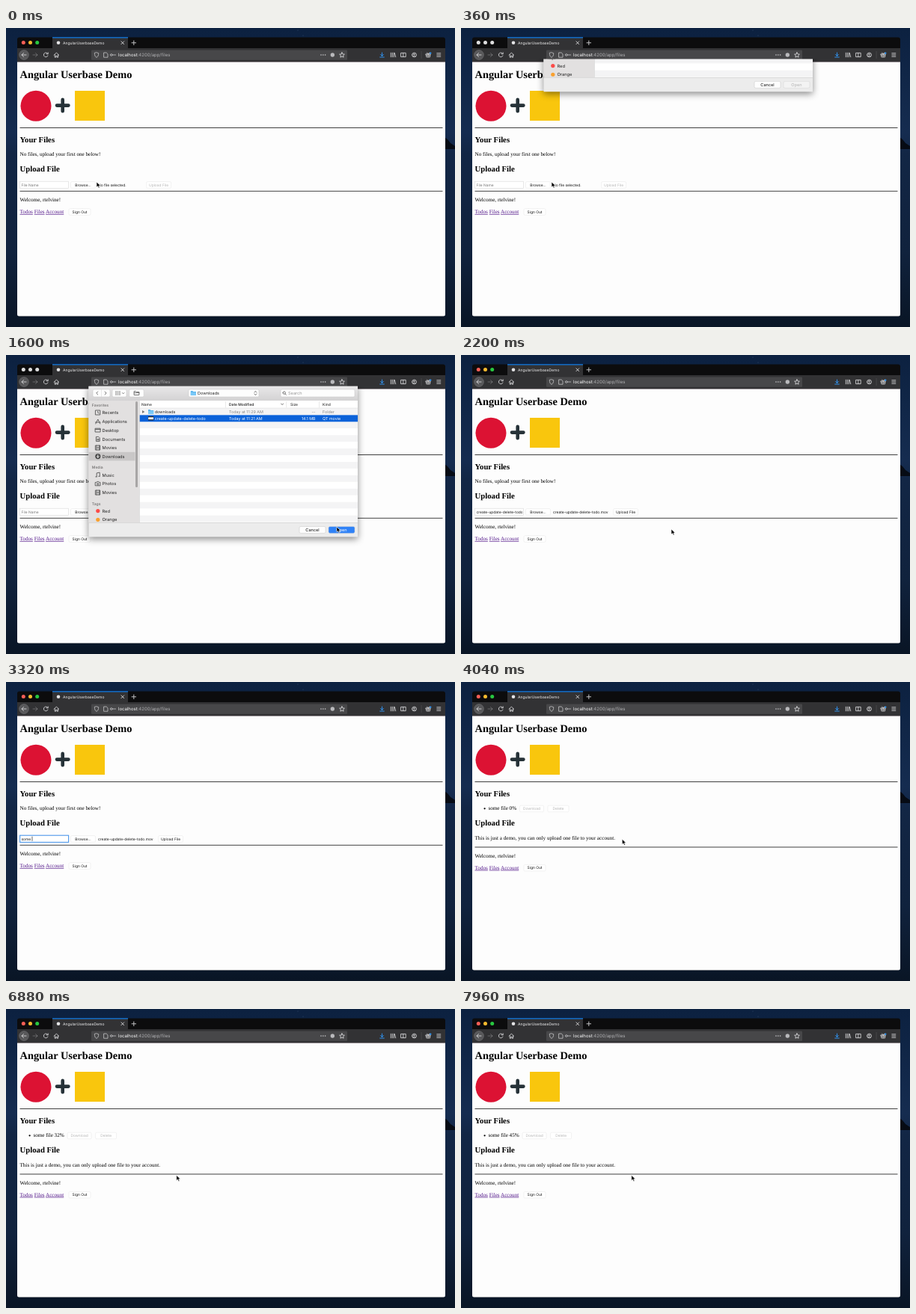
These frames come from a looping animation (600 px wide and 400 px high, 8000 ms). An HTML page:

```html
<!DOCTYPE html>
<html lang="en">
<head>
<meta charset="utf-8">
<title>Angular Userbase Demo</title>
<style>
  html, body { margin: 0; width: 100%; height: 100%; overflow: hidden; background: #0c1c33; }
  svg { display: block; width: 600px; height: 400px; }
  text { white-space: pre; text-rendering: geometricPrecision; font-family: Inter, "Open Sans", sans-serif; }
  .page text.serif { font-family: "Liberation Serif", "Times New Roman", serif; }
  .link { fill: #551a8b; text-decoration: underline; }
  .icon { fill: none; stroke: #d4d4d6; stroke-width: .9; stroke-linecap: round; stroke-linejoin: round; }
  #sheet { filter: drop-shadow(0 3px 5px rgba(0, 0, 0, .45)); }
</style>
</head>
<body>
<svg id="stage" viewBox="0 0 600 400" xmlns="http://www.w3.org/2000/svg"></svg>
<script>
const LOOP = 8000;
const BODY = 7.17, CTRL = 4.92;

const rect = (x, y, w, h, fill, more = '') =>
  `<rect x="${x}" y="${y}" width="${w}" height="${h}" fill="${fill}" ${more}/>`;
const dot = (x, y, r, fill, more = '') =>
  `<circle cx="${x}" cy="${y}" r="${r}" fill="${fill}" ${more}/>`;
const icon = (d, more = '') => `<path class="icon" d="${d}" ${more}/>`;
const sans = (x, y, s, size = CTRL, fill = '#111', more = '') =>
  `<text x="${x}" y="${y}" font-size="${size}" fill="${fill}" ${more}>${s}</text>`;
const serif = (x, y, s, size = BODY, more = '') =>
  `<text class="serif" x="${x}" y="${y}" font-size="${size}" fill="#000" ${more}>${s}</text>`;
const mid = 'text-anchor="middle"';
const button = (x, w, y, label, fill = '#111', id = '') =>
  `<g ${id && `id="${id}"`}>` +
  rect(x, y, w, 8.6, '#fff', 'rx="1.5" stroke="#e9e9e9" stroke-width=".6"') +
  sans(x + w / 2, y + 6.1, label, CTRL, fill, mid) + '</g>';

function wallpaper() {
  return `<defs>
    <linearGradient id="sky" x2="0" y2="1">
      <stop offset="0" stop-color="#0c2140"/><stop offset=".35" stop-color="#152c50"/>
      <stop offset=".42" stop-color="#122645"/><stop offset=".75" stop-color="#10223d"/>
      <stop offset="1" stop-color="#091525"/>
    </linearGradient>
    <linearGradient id="bar" x2="0" y2="1">
      <stop offset="0" stop-color="#e9e8e9"/><stop offset="1" stop-color="#d3d2d3"/>
    </linearGradient>
    <clipPath id="under"><rect x="60" y="41.5" width="460" height="330"/></clipPath>
    <clipPath id="field"><rect x="19.5" y="205" width="63" height="10"/></clipPath>
    <clipPath id="list"><rect x="110" y="61" width="360" height="163"/></clipPath>
  </defs>` + rect(0, 0, 600, 400, 'url(#sky)') +
  '<path d="M586 146l4 3 4 5 6 4v4h-14z" fill="#060b14"/>' +
  dot(397, 10, .4, '#5d7596') + dot(390, 3, .4, '#5d7596');
}

function browser() {
  const lights = ['#ff5f57', '#febc2e', '#28c840']
    .map((c, i) => dot(23.3 + i * 9.2, 19.6, 2.5, c, `class="light" data-on="${c}"`)).join('');
  return rect(15, 12.5, 572, 373, '#0c0c0d', 'rx="3"') +
    rect(62, 12.5, 101, 15, '#323234') + rect(62, 12.3, 101, 1.1, '#0a84ff') +
    lights + dot(70, 19.8, 2.3, '#e4e4e6') +
    sans(76, 21.7, 'AngularUserbaseDemo', 5.05, '#f4f4f5') +
    icon('M153.9 17.9l3.8 3.8m0-3.8l-3.8 3.8M168 19.8h5.6m-2.8-2.8v5.6') +
    rect(15, 27, 572, 18.2, '#323234') + rect(15, 45, 572, .7, '#4a3440') +
    dot(24, 36, 6.4, '#58585a', 'stroke="#77777a" stroke-width=".5"') +
    icon('M27 36h-6m2.5-2.5l-2.5 2.5 2.5 2.5') +
    icon('M36 36h6m-2.5-2.5l2.5 2.5-2.5 2.5', 'opacity=".35"') +
    icon('M55.8 34.4a2.9 2.9 0 1 0 .2 2.6M56.2 32.8v2h-2') +
    icon('M64.2 36.2l3.2-3.2 3.2 3.2m-5.4-.6v3.6h1.5v-2h1.4v2h1.5v-3.6') +
    rect(114, 29.5, 342, 13.3, '#474749', 'rx="1.2"') +
    icon('M121 32.8l2.7.9c0 3-.8 4.6-2.7 5.7-1.9-1.1-2.7-2.7-2.7-5.7z', 'opacity=".8"') +
    icon('M131 33h3.2l1.8 1.8v4.4h-5z', 'opacity=".8"') +
    icon('M142.2 36h4.4M139.4 36a1.3 1.3 0 1 0 2.7 0 1.3 1.3 0 1 0-2.7 0', 'opacity=".8"') +
    sans(150, 38.2, '<tspan fill="#fff">localhost</tspan>:4200/app/files', 6, '#b0b0b3') +
    [421, 423.8, 426.6].map(x => dot(x, 36, .8, '#d4d4d6')).join('') +
    dot(436.3, 36, 2.7, '#b9b9bc') +
    icon('M449 32.7l1 2.2 2.4.3-1.8 1.6.5 2.4-2.1-1.2-2.1 1.2.5-2.4-1.8-1.6 2.4-.3z') +
    '<g transform="translate(0 36)">' +
    icon('M502.5-3v4.4m-2-2l2 2 2-2m-4.8 3.6h5.6', 'style="stroke:#2f9bff"') +
    icon('M514.3-2.8v5.6m2-5.6v5.6m2-5.6v5.6m1-5.4l1.4 5.4') +
    icon('M528-2.6h6.2v5.2H528zM530.8-2.6v5.2') +
    icon('M542.6 0a2.9 2.9 0 1 0 5.8 0 2.9 2.9 0 1 0-5.8 0m1.5 1.9q1.4-1.4 2.8 0M544.7-.8a.8.8 0 1 0 1.6 0 .8.8 0 1 0-1.6 0') +
    rect(554.8, -5, .5, 10, '#59595b') +
    icon('M561.3-1.2h5.8v1.4h-5.8zm.5 1.6v2.4h4.8V.4M564.2-1.2v4m0-4l-1.6-1.8m1.6 1.8l1.6-1.8') +
    dot(567.2, -2.4, 1.2, '#2f9bff') +
    icon('M575.8-2.2h5m-5 2.2h5m-5 2.2h5') + '</g>';
}

function page() {
  const h2 = (y, s) => serif(18.5, y, s, 10.72, 'font-weight="700"');
  const rule = y => rect(18.5, y, 565, .9, '#2b2b2b');
  return '<g class="page">' +
    '<path d="M15 45.6h572v337.4q0 2.5-2.5 2.5h-567q-2.5 0-2.5-2.5z" fill="#fdfdfd"/>' +
    serif(18.5, 67.4, 'Angular Userbase Demo', 14.38, 'font-weight="700"') +
    dot(40, 104.3, 20.5, '#dc1233') +
    '<path d="M68 103.6h15.4M75.7 95.9v15.4" stroke="#263238" stroke-width="4.6" stroke-linecap="round"/>' +
    rect(92, 84, 40, 40, '#f9c60d') +
    rule(133) + h2(152.6, 'Your Files') + h2(192, 'Upload File') +
    '<g id="form">' + serif(18.5, 171.2, 'No files, upload your first one below!') +
    '<rect id="box" x="18.6" y="205.2" width="65" height="9.2" fill="#fff"/>' +
    '<rect id="mark" x="20.2" y="206.4" width="62" height="6.8" fill="#b3d7ff"/>' +
    `<g clip-path="url(#field)">${sans(20.5, 211.6, '', CTRL, '#111', 'id="name"')}</g>` +
    rect(0, 206.6, .6, 6.2, '#000', 'id="caret"') +
    button(86.5, 33, 205.6, 'Browse...') +
    sans(123, 211.7, '', CTRL, '#111', 'id="picked"') +
    button(187.6, 33, 205.6, 'Upload File', '#111', 'send') + '</g>' +
    '<g id="done">' + dot(31.6, 169.3, 1.15, '#000') +
    serif(36.4, 171.2, '', BODY, 'id="pct"') +
    '<g id="acts">' + button(78.5, 32, 165.2, 'Download', '#b4b4b4') +
    button(116, 28, 165.2, 'Delete', '#b4b4b4') + '</g>' +
    serif(18.5, 210.9, 'This is just a demo, you can only upload one file to your account.') + '</g>' +
    '<g id="foot">' + rule(217.8) + serif(18.5, 232, 'Welcome, rtelvine!') +
    serif(18.5, 247.9, ['Todos', 'Files', 'Account'].map(s => `<tspan class="link">${s}</tspan>`).join(' ')) +
    button(84, 29, 241.7, 'Sign Out') + '</g></g>';
}

const folder = (x, y) =>
  `<path d="M${x} ${y}h2.6l.8.9h3.8v5.2h-7.2z" fill="#5ab5ee"/>` + rect(x, y + 2, 7.2, 4.1, '#79c8f7');

function sidebar() {
  const glyphs = {
    clock: 'M-3-3h6v6h-6zM0-1.6V.2l1.4.8',
    apps: 'M-3 3L0-3l3 6M-3.4 1h6.8',
    desk: 'M-3.3-2.4h6.6v4.8h-6.6zM-3.3-1h6.6',
    docs: 'M-2-3h3l1.4 1.4V3H-2zM-1 0h2.4M-1 1.4h2.4',
    film: 'M-3-3h6v6h-6zM-1.7-3v6M1.7-3v6M-1.7 0h3.4',
    music: 'M-1.6 2.4v-5l4-.8v5M-3 2.4h1.3M1 1.8h1.3',
    photo: 'M-3.2-1.8h1.6l.6-1h2l.6 1h1.6v4.4h-6.4zM-1.2.4a1.2 1.2 0 1 0 2.4 0 1.2 1.2 0 1 0-2.4 0'
  };
  const items = [
    [77, 'Recents', 'clock'], [89, 'Applications', 'apps'], [100.6, 'Desktop', 'desk'],
    [112.4, 'Documents', 'docs'], [124, 'Movies', 'film'], [135.6, 'Downloads'],
    [160.5, 'Music', 'music'], [172.2, 'Photos', 'photo'], [184, 'Movies', 'film'],
    [208.6, 'Red', '', '#fc4b48'], [220.3, 'Orange', '', '#f9a02e']
  ];
  return rect(110.5, 61, 67.8, 163, '#e2e0e0') + rect(110.5, 129.8, 62, 11.6, '#c9c7c7') +
    [[67, 'Favorites'], [150.5, 'Media'], [198.6, 'Tags']]
      .map(([y, s]) => sans(114.8, y + 1.9, s, 5, '#7b7979', 'font-weight="600"')).join('') +
    items.map(([y, s, g, c]) => sans(128.5, y + 2.1, s, 5.72, '#222') + (g
      ? `<g transform="translate(122.8 ${y})">${icon(glyphs[g], 'style="stroke:#555"')}</g>`
      : c ? dot(122.8, y, 2.6, c)
      : dot(122.8, y, 3.6, '#4b4b4b') + icon(`M122.8 ${y - 2}v3.6m-1.5-1.5l1.5 1.5 1.5-1.5`, 'style="stroke:#fff"')
    )).join('') +
    rect(173, 62, 3, 115, '#a8a6a6', 'rx="1.5"');
}

function sheet() {
  const box = (x, w, h = 10, y = 46) =>
    rect(x, y, w, h, '#fdfdfd', 'rx="1.8" stroke="#c6c6c6" stroke-width=".5"');
  const dark = d => icon(d, 'style="stroke:#666"');
  const cell = (x, y, s, fill = '#858585', more = '') => sans(x, y, s, 5.36, fill, more);
  const head = (x, s, w = 500) => sans(x, 67.5, s, 4.95, '#333', `font-weight="${w}"`);
  let rows = '';
  for (let i = 0; i < 17; i++) rows += rect(178.3, 71.4 + i * 8.95, 291.7, 8.95, i % 2 ? '#fff' : '#f4f4f5');
  return rect(110.5, 41.5, 359.5, 201.8, '#ececec') + rect(110.5, 41.5, 359.5, 19.5, 'url(#bar)') +
    box(116, 23) + rect(127.4, 46, .5, 10, '#d0d0d0') + box(142, 19) + box(164.7, 19.5) +
    dark('M122.7 49l-2 2 2 2m9.4-4l2 2-2 2') +
    dark('M146.5 49h1m1.5 0h1m1.5 0h1m-6 2h1m1.5 0h1m1.5 0h1m-6 2h1m1.5 0h1m1.5 0h1m3-2.4l1.2 1.2 1.2-1.2') +
    dark('M171.5 48.6h2l.8.9h3.6v4h-6.4zM171.5 50.6h6.4') +
    box(244, 94) + folder(246.8, 48) + sans(256, 53, 'Downloads', 5.5, '#222') +
    dark('M332 50l1.4-1.6 1.4 1.6m-2.8 2l1.4 1.6 1.4-1.6') +
    box(367, 99) + dark('M370 50.6a1.7 1.7 0 1 0 3.4 0 1.7 1.7 0 1 0-3.4 0m3 1.3l1.4 1.4') +
    sans(377, 53, 'Search', 5.6, '#999') +
    `<g clip-path="url(#list)">${rect(178.3, 61, 291.7, 163, '#fff')}${rows}` +
    rect(178.3, 80.35, 291.7, 8.95, '#0b62d9', 'id="pick"') +
    head(181, 'Name') + head(298, 'Date Modified', 600) + head(380, 'Size') + head(423, 'Kind') +
    dark('M367.6 65.2l1.5 1.3 1.5-1.3') +
    [293.2, 374.6, 418].map(x => rect(x, 62, .5, 8.5, '#d3d3d3')).join('') +
    rect(178.3, 70.8, 291.7, .5, '#d3d3d3') +
    '<path d="M182 74l3.4 2-3.4 2z" fill="#777"/>' + folder(190, 73) +
    cell(198.7, 77.8, 'downloads', '#222') + cell(298, 77.8, 'Today at 11:29 AM') +
    cell(413.5, 77.8, '--', '#858585', 'text-anchor="end"') + cell(423, 77.8, 'Folder') +
    rect(190, 82, 7.2, 5.4, '#222') + rect(190.2, 83.3, 6.8, 2.9, '#fff') +
    '<g id="row">' + cell(198.7, 86.7, 'create-update-delete-todo', '#222') +
    cell(298, 86.7, 'Today at 11:21 AM') +
    cell(413.5, 86.7, '14.1 MB', '#858585', 'text-anchor="end"') + cell(423, 86.7, 'QT movie') + '</g>' +
    sidebar() + '</g>' + rect(178.1, 61, .5, 163, '#cfcfcf') + rect(110.5, 224, 359.5, .6, '#cdcdcd') +
    box(392, 35, 9, 229.4) + sans(409.5, 235.9, 'Cancel', 5.6, '#111', mid) +
    rect(431, 229.4, 35, 9, '#f3f3f3', 'id="openBox" rx="1.8" stroke="#d2d2d2" stroke-width=".5"') +
    sans(448.5, 235.9, 'Open', 5.6, '#b3b3b3', `id="openText" ${mid}`);
}

const stage = document.getElementById('stage');
stage.innerHTML = wallpaper() + browser() + page() +
  `<g clip-path="url(#under)"><g id="sheet">${sheet()}</g></g>` +
  '<path id="pointer" d="M0 0v7l1.7-1.5 1.1 2.6 1.3-.6-1.1-2.5h2.2z" fill="#000" stroke="#fff" stroke-width=".6"/>';

const el = {};
stage.querySelectorAll('[id]').forEach(n => el[n.id] = n);
const lights = stage.querySelectorAll('.light');
const rowTexts = [...el.row.children].map(n => [n, n.getAttribute('fill')]);

const show = (n, on) => n.setAttribute('visibility', on ? 'visible' : 'hidden');
const move = (n, x, y) => n.setAttribute('transform', `translate(${x} ${y})`);
const ramp = (t, a, b) => {
  const u = Math.min(1, Math.max(0, (t - a) / (b - a)));
  return u * u * (3 - 2 * u);
};

// Pointer stops: time, x, y
const stops = [
  [0, 121, 206], [480, 121, 206], [950, 237.4, 85.5], [1220, 237.4, 85.5], [1640, 447, 233.5],
  [1840, 447, 233.5], [2200, 281, 233], [2600, 62, 209.5], [3660, 62, 209.5],
  [3900, 215.3, 210.2], [4100, 215.3, 210.2], [4400, 227.8, 222.4]
];

function pointerAt(t) {
  let i = 1;
  while (i < stops.length && stops[i][0] < t) i++;
  if (i === stops.length) return stops[i - 1].slice(1);
  const [a, x, y] = stops[i - 1], [b, x2, y2] = stops[i];
  const u = ramp(t, a, b);
  return [x + (x2 - x) * u, y + (y2 - y) * u];
}

const FILE = 'create-update-delete-todo';
const TYPED = 'some file';

function draw(t) {
  const open = ramp(t, 280, 520) - ramp(t, 1760, 1960);
  const selected = t >= 1180, chosen = t >= 1960, focus = t >= 2650, sent = t >= 3960;
  const keys = Math.max(0, Math.min(TYPED.length, Math.floor((t - 2950) / 85) + 1));

  show(el.sheet, open > 0);
  move(el.sheet, 0, -215 * (1 - open));
  lights.forEach(n => n.setAttribute('fill', open > 0 ? '#dededf' : n.dataset.on));
  show(el.pick, open > 0 && selected);
  rowTexts.forEach(([n, c]) => n.setAttribute('fill', selected ? '#fff' : c));
  el.openBox.setAttribute('fill', selected ? '#2f82f7' : '#f3f3f3');
  el.openText.setAttribute('fill', selected ? '#fff' : '#b3b3b3');

  show(el.form, !sent);
  show(el.done, sent);
  el.name.textContent = keys ? TYPED.slice(0, keys) : chosen ? FILE : 'File Name';
  el.name.setAttribute('fill', chosen ? '#111' : '#777');
  el.box.setAttribute('stroke', focus ? '#4c97ea' : '#d9d9d9');
  el.box.setAttribute('stroke-width', focus ? 1.1 : .6);
  show(el.mark, focus && !keys);
  show(el.caret, keys && !sent);
  el.caret.setAttribute('x', 20.6 + (keys ? el.name.getComputedTextLength() : 0));
  el.picked.textContent = chosen ? FILE + '.mov' : 'No file selected.';
  move(el.send, chosen ? 15.9 : 0, 0);
  el.send.lastChild.setAttribute('fill', chosen ? '#111' : '#b4b4b4');

  const pct = Math.max(0, Math.floor(19.4 + (t - 5760) * 26 / 2200));
  el.pct.textContent = `some file ${pct}%`;
  move(el.acts, pct > 9 ? BODY / 2 : 0, 0);
  move(el.foot, 0, sent ? 2.7 : 0);

  show(el.pointer, t < 2950 || t >= 3660);
  move(el.pointer, ...pointerAt(t));
}

const start = performance.now();
function tick(now) {
  draw(Math.max(0, now - start) % LOOP);
  requestAnimationFrame(tick);
}
draw(0);
requestAnimationFrame(tick);
</script>
</body>
</html>
```
